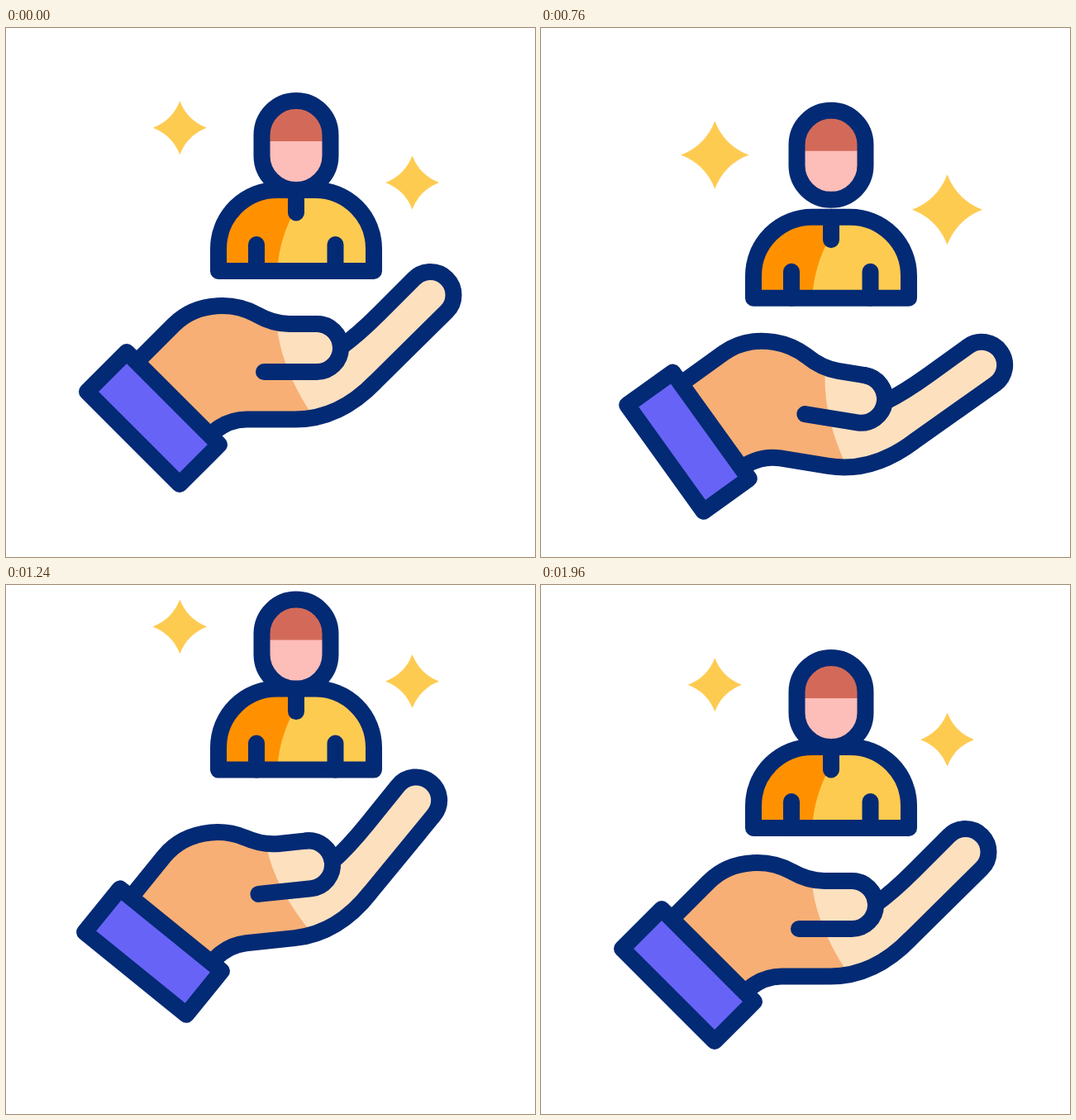
An HTML page for the animation above (2040 ms loop, 640 px wide and 640 px high).

```html
<!DOCTYPE html>
<html lang="en">
<head>
<meta charset="utf-8">
<title>Caring hand</title>
<style>
html, body { margin: 0; width: 100%; height: 100%; overflow: hidden; background: #fff; }
svg { display: block; width: 100%; height: 100%; }
.line { fill: none; stroke: #032a74; stroke-width: 20; stroke-linecap: round; stroke-linejoin: round; }
</style>
</head>
<body>
<svg viewBox="0 0 640 640">
  <defs>
    <path id="star" fill="#fecb51" d="M0-32.5Q9-9 32.5 0Q9 9 0 32.5Q-9 9-32.5 0Q-9-9 0-32.5Z"/>
    <path id="torso" d="M257 294V267a71 71 0 0 1 71-71h46a71 71 0 0 1 71 71v27Z"/>
    <rect id="skull" x="309.5" y="88" width="83" height="108" rx="41.5"/>
    <path id="palm" d="M158 404L203 359C219 343 240 336 262 336C277 336 291 340 303 346.5C316 354 328 358 343 358H376A29 29 0 0 1 405 386C422 374 437 360 452 345L493.7 303.2A28 28 0 0 1 533.3 342.8L447 428C420 456 387 473.5 350 473.5H291C275 473.5 262 480 252 488"/>
    <clipPath id="inTorso"><use href="#torso"/></clipPath>
    <clipPath id="inSkull"><use href="#skull"/></clipPath>
    <clipPath id="inPalm"><use href="#palm"/></clipPath>
  </defs>

  <g id="hand">
    <use href="#palm" fill="#f7af75"/>
    <path clip-path="url(#inPalm)" fill="#fde0be" d="M327 350C329 395 348 435 374 474H600V250H327Z"/>
    <use href="#palm" class="line"/>
    <path class="line" d="M376 358a29 29 0 0 1 0 58H312"/>
    <path class="line" style="fill:#6863f7" d="M98 440L146 392L258 504L210 552Z"/>
  </g>

  <g id="lift">
    <use href="#star" id="leftStar"/>
    <use href="#star" id="rightStar"/>
    <use href="#torso" fill="#fecb51"/>
    <path clip-path="url(#inTorso)" fill="#ff9100" d="M328 294Q331 250 353 215V190H250V294Z"/>
    <use href="#torso" class="line"/>
    <path class="line" d="M303 262v32M398.5 262v32M351 196v27.5"/>
    <g id="head">
      <use href="#skull" fill="#fdbdb8"/>
      <path clip-path="url(#inSkull)" fill="#d36a59" d="M300 80h102v57h-102Z"/>
      <use href="#skull" class="line"/>
    </g>
  </g>
</svg>
<script>
const LOOP = 2040, STEP = 40;

// Symmetric ease-in-out, cubic-bezier(.5, 0, .5, 1)
function ease(x) {
  let s = x;
  for (let i = 0; i < 6; i++)
    s -= (1.5 * s * (1 - s) + s ** 3 - x) / (1.5 - 3 * s + 3 * s * s);
  return s * s * (3 - 2 * s);
}

// Value at time t along eased [time, value] keys
function track(t, keys) {
  if (t <= keys[0][0]) return keys[0][1];
  for (let i = 1; i < keys.length; i++) {
    const [t0, a] = keys[i - 1], [t1, b] = keys[i];
    if (t < t1) return a + (b - a) * ease((t - t0) / (t1 - t0));
  }
  return keys[keys.length - 1][1];
}

// Dip down, toss up, settle
const toss = (t, low, high) =>
  track(t, [[0, 0], [660, low], [1256, high], [1283, high], [1915, 0]]);

const move = (id, value) =>
  document.getElementById(id).setAttribute("transform", value);

function draw(now) {
  const t = Math.floor((now % LOOP) / STEP) * STEP;
  move("hand", `translate(0 ${toss(t, 31.3, -28.5)}) rotate(${toss(t, 10, -6)} 178 472)`);
  move("lift", `translate(0 ${toss(t, 37.5, -70.5)})`);
  move("head", `translate(0 ${track(t, [[0, 0], [810, -21], [1197, 0]])})`);
  const left = track(t, [[370, 1], [940, 1.325], [1290, 1]]);
  const right = track(t, [[0, 1], [520, 1.49], [1075, 1]]);
  move("leftStar", `translate(210.3 120.8) scale(${left})`);
  move("rightStar", `translate(491.5 187) scale(${right})`);
}

let start;
function tick(now) {
  start ??= now;
  draw(now - start);
  requestAnimationFrame(tick);
}
draw(0);
requestAnimationFrame(tick);
</script>
</body>
</html>
```
